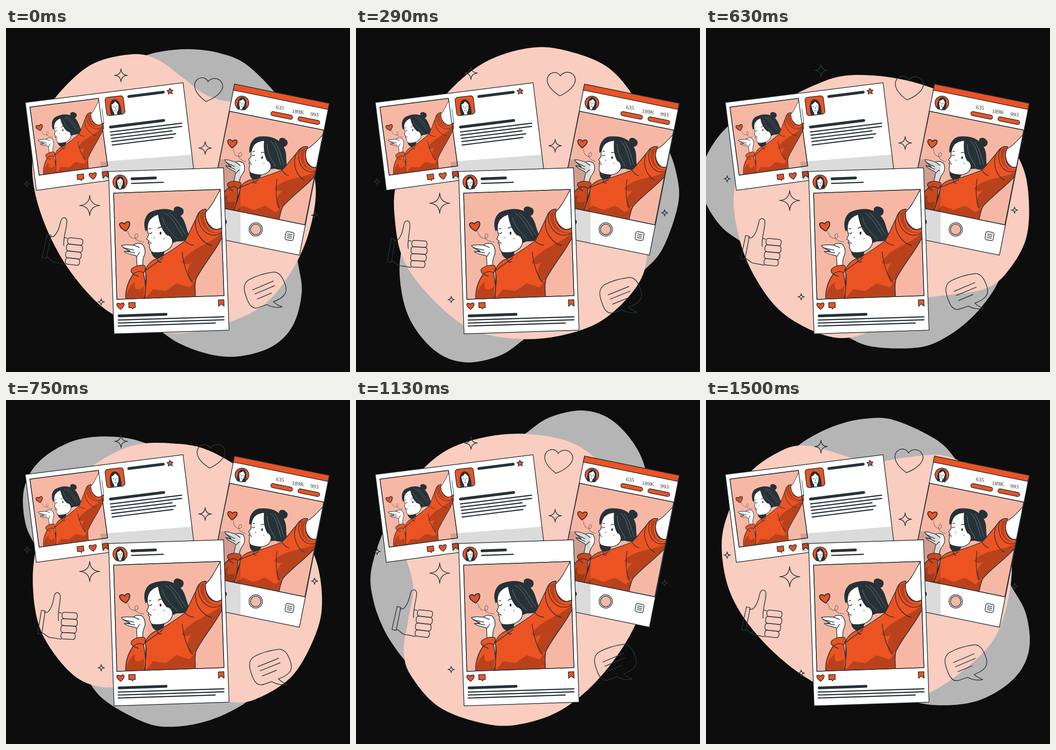
An HTML page that plays this animation: 748x748 px, repeating every 1540 ms.

```html
<!DOCTYPE html>
<html lang="en">
<head>
<meta charset="utf-8">
<title>Social posts</title>
<style>
  html, body { margin: 0; height: 100%; overflow: hidden; background: #0d0d0d; }
  svg { display: block; width: 100vw; height: 100vh; }
  .line { fill: none; stroke: #263238; stroke-width: 1.5; stroke-linecap: round; stroke-linejoin: round; }
  .white { fill: #fff; }
  .photo { fill: #f6b8a5; }
  .orange { fill: #ec5323; }
  .shade { fill: #b9421c; stroke: none; }
  .dark { fill: #263238; }
  .shadow { fill: #000; opacity: .14; stroke: none; }
  .bar { stroke-width: 6; }
  .thin { stroke-width: 2.4; }
  text { font: 12px "Liberation Serif", serif; fill: #263238; stroke: none; text-anchor: middle; }
</style>
</head>
<body>
<svg viewBox="0 0 748 748">
  <defs>
    <clipPath id="mainPhoto"><path d="M234 359L466 351L474 582L241 590Z"/></clipPath>
    <clipPath id="leftPhoto"><path d="M52 172L201 153L212 185L214 215L221 300L72 320Z"/></clipPath>
    <clipPath id="phonePhoto"><path d="M486 181L691 222L650 428L444 386Z"/></clipPath>
    <clipPath id="leftCard"><path d="M42 162L385 119L408 306L66 353Z"/></clipPath>
    <clipPath id="phoneCard"><path d="M497 122L703 164L638 494L432 452Z"/></clipPath>

    <path id="like" class="orange" d="M0 7C-5 3-8 0-8-4C-8-8-2-8 0-4C2-8 8-8 8-4C8 0 5 3 0 7Z"/>
    <path id="comment" class="orange" d="M-7-6H7V5H3L1 8L-1 5H-7Z"/>
    <path id="save" class="orange" d="M-6-7H6V7L0 2L-6 7Z"/>

    <g id="face">
      <path class="dark" d="M-8 13C-10 2-9-12 0-13C9-12 10 2 9 13Z"/>
      <path class="white" stroke="none" d="M-6-5C-3-6 0-8 1-10C3-7 6-5 6-3C6 4 4 8 2 9L2 13H-3L-3 9C-5 7-6 1-6-5Z"/>
      <path class="line" style="stroke-width:.8" d="M-4-1H-2M2-1H4M0 0V3M-2 6Q0 7 2 6"/>
    </g>

    <g id="girl" class="line">
      <!-- hair, face and neck -->
      <path class="dark" d="M367 400C361 390 373 386 380 391C389 395 386 406 378 408C392 420 390 441 400 454C394 461 384 464 372 463L356 469L340 440L310 436L304 441C298 424 303 404 319 399C337 393 353 392 367 400Z"/>
      <path class="dark" d="M316 485L345 481L341 499C331 505 318 500 316 485Z"/>
      <path class="white" d="M310 421C306 431 307 441 310 450L306 459L311 463L309 467L312 471C311 479 314 486 320 488C331 489 344 488 352 482C359 477 362 471 362 465C362 454 354 450 350 450C340 440 334 424 331 405C322 408 314 413 310 421Z"/>
      <path d="M331 436Q335 431 342 434M311 437L315 436M311 446Q315 449 317 444M311 466L316 468M322 456H323M343 458H344"/>
      <ellipse class="dark" cx="336" cy="446" rx="1.2" ry="2.5"/>
      <path d="M346 403C361 410 370 430 384 452M355 402C373 416 381 437 391 450M340 412C347 438 362 446 372 459" style="stroke:#73797c;stroke-width:1"/>

      <!-- raised forearm -->
      <path class="white" d="M470 345C457 365 450 386 432 402C435 427 451 446 475 436Z"/>

      <!-- sweater -->
      <path class="orange" d="M300 592C299 567 307 550 303 528C306 514 319 503 335 499C355 487 372 476 389 463C399 447 405 429 413 415C417 401 425 394 435 394C429 421 446 451 473 432V449C459 481 429 514 413 546C409 559 413 574 411 592Z"/>
      <path class="shade" d="M474 441C449 469 399 477 382 510C390 516 398 514 405 508C393 522 391 539 402 553L413 546C429 516 454 489 474 447Z"/>
      <path class="shade" d="M303 588L320 568L347 572L371 555L399 564L412 549L411 592H303Z"/>
      <path class="shade" d="M433 397C424 421 442 455 472 441C447 456 419 435 422 402Z"/>
      <path d="M435 394C424 394 418 401 418 413C421 443 449 462 471 443M433 403C435 430 452 448 472 432M413 414C407 443 427 468 447 473M389 463C394 468 401 472 408 472M383 487C386 512 393 537 406 553M303 528C323 512 335 506 341 499M330 500C327 507 333 511 338 508M303 530C309 552 300 568 303 592M473 449C459 481 429 514 413 546C409 559 413 574 411 592"/>

      <!-- hand blowing a kiss -->
      <path class="white" d="M285 523L284 496C277 492 265 493 257 486L270 485C261 481 253 477 251 473C260 470 270 472 278 472C282 467 289 468 295 469C303 476 303 486 302 491C299 499 296 504 298 521Z"/>
      <path d="M255 478L278 483M262 486L280 489M277 472L290 477M291 488Q287 491 286 496"/>
      <path class="orange" d="M273 524C282 516 294 514 302 517C305 523 302 527 299 533C302 549 307 571 299 592H261C258 571 267 548 277 535C272 532 271 528 273 524Z"/>
      <path class="shade" d="M261 591C261 575 269 559 281 552C276 567 285 575 300 562V592Z"/>
      <path d="M277 535Q289 526 299 532M278 536L288 540M261 590C258 571 267 548 277 535"/>

      <use href="#like" transform="translate(259 432) rotate(-10) scale(1.4)"/>
      <path d="M265 443C269 457 277 459 285 456C290 450 284 444 281 449C277 460 289 465 302 465" style="stroke-dasharray:.5 3"/>
    </g>
  </defs>

  <rect width="748" height="748" fill="#0d0d0d"/>
  <path id="grey" fill="#b5b5b5"/>
  <path id="pink" fill="#f9cdbf"/>

  <g id="sparkles" class="line"></g>
  <path id="heart" class="line" d="M436 158C422 148 410 136 411 121C413 105 434 101 440 115C447 104 468 105 472 122C474 138 452 152 436 158Z"/>
  <g id="thumb" class="line">
    <path d="M88 450L96 452L86 502L77 500ZM94 455L101 455C111 447 114 433 117 421C119 410 132 411 130 424C129 440 122 458 124 474M126 457L131 458M87 499C98 505 97 510 108 511L128 515"/>
    <g transform="translate(130 456) rotate(6)">
      <rect x="3" width="33" height="14" rx="5"/><rect x="2" y="14" width="35" height="15" rx="5"/>
      <rect x="2" y="29" width="34" height="15" rx="5"/><rect x="3" y="44" width="31" height="14" rx="5"/>
    </g>
  </g>
  <path id="bubble" class="line" d="M530 549C548 539 565 535 583 532.5C596 531 604 545 609 560C615 577 607 588 583 597C588 602 594 605 602 608C590 611 577 608 569 603L552 609C540 614 532 606 527 594C520 577 514 559 530 549ZM538 571L583 552M543 580L586 562M548 591L579 578"/>

  <!-- wide post -->
  <g class="line">
    <path class="white" d="M42 162L385 119L408 306L66 353Z"/>
    <path class="photo" d="M52 172L201 153L221 300L72 320Z"/>
    <g clip-path="url(#leftPhoto)"><use href="#girl" transform="translate(73 217) rotate(-4.4) scale(.649) translate(-259 -432)"/></g>
    <path d="M52 172L201 153L221 300L72 320Z"/>
    <g transform="translate(237 169) rotate(-7)">
      <rect class="orange" x="-20" y="-20" width="40" height="40" rx="6"/>
      <use href="#face" transform="translate(0 3) scale(1.25)"/>
    </g>
    <path class="orange" d="M356 131L359 135L363 135L360 139L362 143L357 141L353 144L353 139L350 136L355 135Z"/>
    <path class="bar" d="M267 149L342 139.5M227 215.5L343 201"/>
    <path class="thin" d="M227 226L382 207M228 233L382 214M229 240L361 223.5M230 247L369 230M231 254.5L363 238"/>
    <use href="#comment" transform="translate(162 324) rotate(-7)"/>
    <use href="#like" transform="translate(189 322) rotate(-7)"/>
    <use href="#save" transform="translate(216 319) rotate(-7)"/>
    <path class="shadow" clip-path="url(#leftCard)" d="M205 291L420 274V330H210Z"/>
  </g>

  <!-- phone profile -->
  <g class="line">
    <path class="white" d="M497 122L703 164L638 494L432 452Z"/>
    <path class="orange" d="M497 122L703 164L700 177L494 135Z"/>
    <path class="photo" d="M486 181L691 222L650 428L444 386Z"/>
    <g clip-path="url(#phonePhoto)"><use href="#girl" transform="translate(492 252) rotate(14.4) scale(.913) translate(-259 -432)"/></g>
    <path d="M486 181L691 222L650 428L444 386Z"/>
    <circle class="orange" cx="513" cy="163" r="15"/>
    <use href="#face" transform="translate(513 164) rotate(8)"/>
    <text transform="translate(595.5 177) rotate(6)">635</text>
    <text transform="translate(634.5 186) rotate(6)">189K</text>
    <text transform="translate(670.5 192) rotate(6)">993</text>
    <rect class="orange" x="-24" y="-4.5" width="48" height="9" rx="4.5" transform="translate(599.5 190) rotate(11.5)"/>
    <rect class="orange" x="-24" y="-4.5" width="48" height="9" rx="4.5" transform="translate(658.5 201.5) rotate(11.5)"/>
    <circle class="white" cx="543" cy="438" r="14.5"/>
    <circle class="photo" cx="543" cy="438" r="11.5"/>
    <g transform="translate(616.5 452.5) rotate(9)">
      <rect x="-9" y="-9" width="18" height="18" rx="4"/>
      <path d="M-5-4H5M-5 0H5M-5 4H5"/>
    </g>
    <path class="dark" d="M474 416Q482 418 478 426L474 431Z"/>
    <path class="shadow" clip-path="url(#phoneCard)" d="M455 285L478 286L510 295V475H455Z"/>
  </g>

  <!-- front post -->
  <g class="line">
    <path class="white" d="M223 312L473 304L485 657L235 665Z"/>
    <path class="photo" d="M234 359L466 351L474 582L241 590Z"/>
    <g clip-path="url(#mainPhoto)"><use href="#girl"/></g>
    <path d="M234 359L466 351L474 582L241 590Z"/>
    <circle class="orange" cx="248" cy="335" r="15.5"/>
    <use href="#face" transform="translate(248 336) rotate(-2)"/>
    <path class="bar" d="M274 328L325 326M246 626L348 622.5"/>
    <path class="thin" d="M273 338L342 335.5M244 635L474 628M244 641.5L474 634.5M244 648L455 641.5"/>
    <use href="#like" transform="translate(249 605) rotate(-2)"/>
    <use href="#comment" transform="translate(274 603) rotate(-2)"/>
    <use href="#save" transform="translate(468 598) rotate(-2)"/>
  </g>
</svg>
<script>
const $ = id => document.getElementById(id);
const pose = (id, value) => $(id).setAttribute("transform", value);

// Closed Catmull-Rom curve through a flat list of coordinates.
function smooth(flat) {
  const n = flat.length / 2;
  const at = i => { const k = (i + n) % n; return [flat[2 * k], flat[2 * k + 1]]; };
  let d = "M" + at(0);
  for (let i = 0; i < n; i++) {
    const [a, b, c, e] = [at(i - 1), at(i), at(i + 1), at(i + 2)];
    const c1 = b.map((v, k) => v + (c[k] - a[k]) / 6);
    const c2 = c.map((v, k) => v - (e[k] - b[k]) / 6);
    d += `C${c1} ${c2} ${c}`;
  }
  return d + "Z";
}

$("grey").setAttribute("d", smooth([
  235,88, 300,61, 345,50, 400,46, 462,54, 522,79, 590,147, 617,203, 630,290, 622,410,
  634,505, 643,575, 622,650, 570,697, 485,715, 400,696, 332,655, 250,570, 180,200]));
$("pink").setAttribute("d", smooth([
  57,310, 72,215, 110,148, 185,80, 275,57, 330,69, 383,107, 442,149, 515,166, 592,189,
  642,240, 673,340, 660,440, 620,530, 555,606, 453,650, 360,664, 278,643, 205,603, 130,515, 78,410]));

const sparkles = [[250,103,14], [433,261,14], [182,386,22], [46,339,7], [207,595.5,7], [671,407,7]];
$("sparkles").innerHTML = sparkles.map(([x, y, r]) => {
  const w = r * .06;
  return `<path transform="translate(${x} ${y})" d="M0 ${-r}Q${w} ${-w} ${r} 0Q${w} ${w} 0 ${r}Q${-w} ${w} ${-r} 0Q${-w} ${-w} 0 ${-r}Z"/>`;
}).join("");

// Triangle wave: 1 at whole numbers, 0 halfway between.
const triangle = x => Math.abs(2 * (x - Math.floor(x)) - 1);
const ease = x => x * x * (3 - 2 * x);

function draw(now) {
  const frame = Math.floor((now % 1540) * .024 + .2);
  const beat = frame <= 27 ? frame : 27 + (frame - 27) * 1.19;
  const sway = 1.25 * ease(triangle((beat - 6) / 13.33)) - .2;
  pose("grey", `rotate(${beat * 9} 367 375)`);
  pose("pink", `rotate(${beat * 9} 362 375)`);
  pose("sparkles", `translate(0 ${-14.6 * (1 - triangle(beat / 40))})`);
  pose("heart", `translate(${5.5 * sway} ${-11 * sway}) rotate(${-4 * sway} 441 131)`);
  pose("thumb", `translate(${-11 * sway} ${6 * sway}) rotate(${-3 * sway} 121 465)`);
  pose("bubble", `translate(${10.5 * sway} ${10 * sway}) rotate(${sway} 565 571)`);
  requestAnimationFrame(() => draw(performance.now()));
}
draw(0);
</script>
</body>
</html>
```
